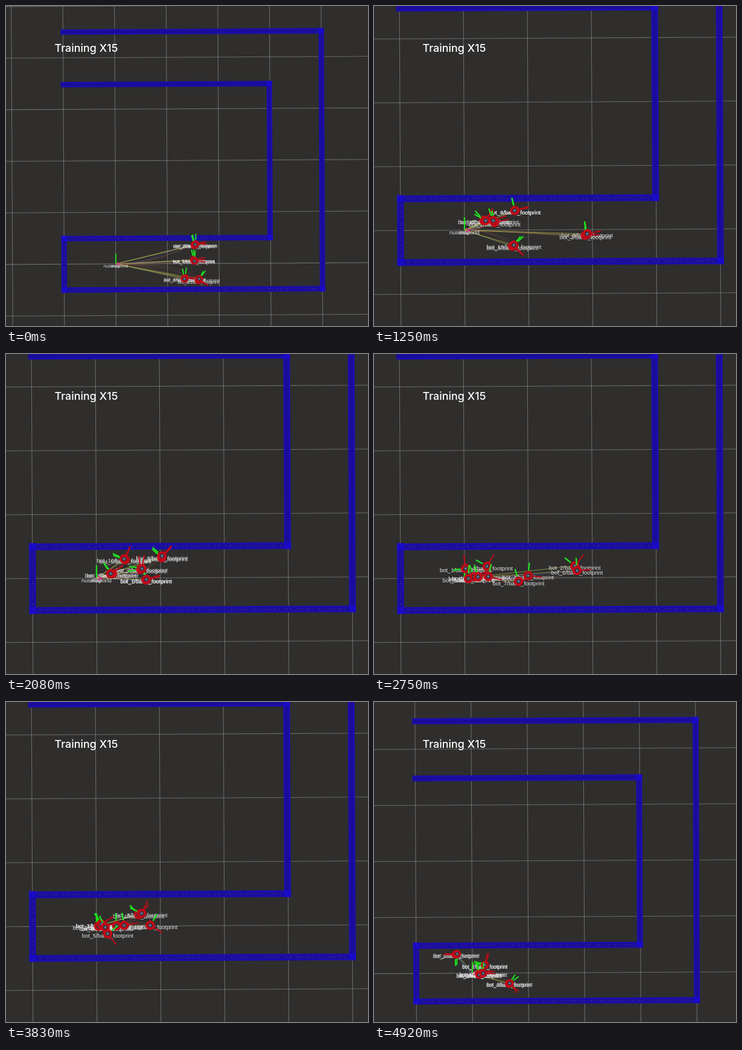
Write an HTML page that moves like this. It is 600x531 px and loops after 5 s.

```html
<!DOCTYPE html>
<html lang="en">
<head>
<meta charset="utf-8">
<title>Training X15</title>
<style>
  html, body { margin: 0; width: 100%; height: 100%; overflow: hidden; background: #2f2e2d; }
  svg { display: block; width: 100vw; height: 100vh; }
  .grid { stroke: #a5a5a5; stroke-opacity: .5; stroke-width: 1.1; }
  .grid line { vector-effect: non-scaling-stroke; }
  .wall { fill: none; stroke: #1b0eaa; stroke-width: 10.6; }
  .core { fill: none; stroke: #190c98; stroke-width: 4; }
  .speck { fill: none; stroke: #352a92; stroke-width: 1.2; stroke-dasharray: 3 2 1 4 5 2; }
  .post { fill: #1b0bc8; }
  .link { stroke: #abb052; stroke-opacity: .75; stroke-width: .9; }
  .trail { fill: none; stroke-width: .9; }
  .tag { font: 8.85px "Liberation Sans", Arial, sans-serif; fill: #e4e4e4; text-anchor: middle; }
  .red { stroke: #b80c18; stroke-width: 2; }
  .green { stroke: #1ee01e; stroke-width: 2.2; }
  .ring { fill: #33343c; stroke: #c00a18; stroke-width: 3.8; }
  .hub { fill: #66789a; }
  .title { font: 500 17.95px Inter, sans-serif; fill: #fff; }
</style>
</head>
<body>
<svg viewBox="0 0 600 531" preserveAspectRatio="none">
  <rect width="600" height="531" fill="#2f2e2d"/>
  <g id="map"><g id="grid" class="grid"></g><g id="walls"></g></g>
  <g id="scene">
    <g id="lines"></g>
    <g id="tags"></g>
    <path d="M0 -1V-20" class="green"/>
    <path d="M2 -3L9 0L2 3" fill="none" stroke="#d02b86" stroke-width="1.6"/>
    <g id="bots"></g>
  </g>
  <text x="80.5" y="76" class="title">Training X15</text>
</svg>
<script>
const LOOP = 5000, STEPS = 60, CELL = 100, BOTS = 10, RAD = Math.PI / 180;
const $ = id => document.getElementById(id);

function set(el, attrs) {
  for (const k in attrs) el.setAttribute(k, attrs[k]);
}
function add(parent, tag, attrs, text) {
  const el = document.createElementNS("http://www.w3.org/2000/svg", tag);
  set(el, attrs);
  if (text) el.textContent = text;
  return parent.appendChild(el);
}
const mix = (a, b, u) => a + (b - a) * u;
const clamp = u => Math.max(0, Math.min(1, u));

let seed = 15;
function jitter(size) {
  seed = (seed * 16807) % 2147483647;
  return (seed / 2147483647 * 2 - 1) * size;
}

// View: origin x, origin y, pixels per cell
const firstView = [182, 428, 85.6];
const moves = [
  { from: 0, steps: 5, to: [144, 323.5, 106] },
  { from: 8, steps: 5, to: [150, 372, 106] },
  { from: 49, steps: 2, to: [141, 426, 105.7] },
  { from: 51, steps: 4, to: [163, 450, 93] }
];
const camera = n => moves.reduce(
  (view, m) => view.map((v, k) => mix(v, m.to[k], clamp((n - m.from) / m.steps))), firstView);

// Each scene has a few spots (x, y, heading); the bots, counted from the lead,
// share them in turn, and later arrivals stand a little off.
const scenes = [];
function scene(n, lead, ...spots) {
  const bots = [];
  for (let i = 0; i < BOTS; i++) {
    const [x, y, h] = spots[i % spots.length], off = i < spots.length ? 0 : 1;
    bots[(lead - 1 + i) % BOTS] = { x: x + jitter(3) * off, y: y + jitter(3) * off, h: h + jitter(20) * off };
  }
  scenes.push({ n, bots });
}
scene(0, 1, [151, -8, 0], [152, -36, 15], [160, 32, -28], [134, 27, -8]);
scene(6, 1, [322, -50, 98], [72, -25, 15], [47, 3, 10], [12, 0, 0]);
scene(15, 3, [189, 8, 2], [79, -31, 15], [75, 25, -40], [33, -15, 60], [45, -15, 20]);
scene(25, 3, [102, -32, 48], [25, -7, 40], [45, -29, 70], [78, 2, 18], [71, -15, 80]);
scene(41, 6, [274, -26, -10], [98, 25, -48], [44, -28, 95], [20, 3, 0], [31, 25, -92], [-74, -33, 180]);
scene(51, 10, [137, -28, 28], [22, -28, 145], [100, -12, 22], [10, -1, 40], [86, -6, 5], [15, 19, -97]);
scene(59, 1, [-30, -33, 180], [22, -14, 78], [12, 1, 15], [65, 19, -35], [18, 0, 10]);

// Curve driven from the origin to a pose
function curve(p) {
  const d = Math.hypot(p.x, p.y) * .22, a = p.h * RAD;
  return [[0, 0], [p.x * .5, 0], [p.x - Math.cos(a) * d, p.y + Math.sin(a) * d], [p.x, p.y]];
}
function along(points, u) {
  while (points.length > 1)
    points = points.slice(1).map((q, i) => q.map((v, k) => mix(points[i][k], v, u)));
  return points[0];
}
function drive(a, b, u) {
  const turn = ((b.h - a.h + 540) % 360 + 360) % 360 - 180;
  if (Math.hypot(b.x, b.y) > Math.hypot(a.x, a.y) - 25)
    return { x: mix(a.x, b.x, u), y: mix(a.y, b.y, u), h: a.h + turn * u };
  const crash = .35;                   // then respawn at the origin
  if (u < crash) {
    const d = u * 28, t = a.h * RAD;
    return { x: a.x + Math.cos(t) * d, y: a.y - Math.sin(t) * d, h: a.h };
  }
  const v = (u - crash) / (1 - crash), [x, y] = along(curve(b), v);
  return { x, y, h: b.h * v };
}

for (let p = -700; p <= 700; p += CELL) {
  add($("grid"), "line", { x1: p, x2: p, y1: -700, y2: 400 });
  add($("grid"), "line", { x1: -700, x2: 700, y1: p, y2: p });
}
const walls = "M-105 -450H400V50H-100V-50M-105 -348H299V-49.5H-105";
for (const kind of ["wall", "core"]) add($("walls"), "path", { d: walls, class: kind });
add($("walls"), "path", { d: "M290 -49.5H-95M-100 -40V45M-90 50H390", class: "speck" });
for (const [x, y] of [[400, -450], [400, 50], [-100, 50], [-100, -50], [299, -49.5], [299, -348]])
  add($("walls"), "rect", { x: x - 5.4, y: y - 5.4, width: 10.8, height: 10.8, class: "post" });

for (const name of ["nusim/world", "map"]) add($("tags"), "text", { x: 0, y: 7, class: "tag" }, name);

const bots = Array.from({ length: BOTS }, (_, i) => {
  const blue = i % 5 === 0;
  const bot = {
    trail: add($("lines"), "path", { class: "trail", stroke: blue ? "#3f4fa6" : "#a5604c", opacity: blue ? .75 : .4 }),
    link: add($("lines"), "line", { x1: 0, y1: 0, class: "link" }),
    tag: add($("tags"), "text", { class: "tag" }, `bot_${i + 1}/base_footprint`),
    body: add($("bots"), "g", {})
  };
  add(bot.body, "path", { d: "M5 0H22", class: "red" });
  add(bot.body, "path", { d: "M0 -8V-20", class: "green" });
  add(bot.body, "circle", { r: 5.4, class: "ring" });
  add(bot.body, "circle", { r: 1.8, class: "hub" });
  return bot;
});

function draw(ms) {
  // source clock ticks in whole steps, rounded to 10 ms
  const n = Math.floor((ms % LOOP + 4) * STEPS / LOOP) % STEPS;
  const [ox, oy, size] = camera(n), k = size / CELL;
  set($("map"), { transform: `translate(${ox} ${oy}) rotate(-.29) scale(${k})` });
  set($("scene"), { transform: `translate(${ox} ${oy}) scale(${k})` });

  let i = 0;
  while (i < scenes.length - 2 && n >= scenes[i + 1].n) i++;
  const a = scenes[i], b = scenes[i + 1], u = (n - a.n) / (b.n - a.n);
  bots.forEach((bot, j) => {
    const p = drive(a.bots[j], b.bots[j], u), [start, ...rest] = curve(p);
    set(bot.trail, { d: `M${start}C${rest.join(" ")}` });
    set(bot.link, { x2: p.x, y2: p.y });
    set(bot.tag, { x: p.x, y: p.y + 6 });
    set(bot.body, { transform: `translate(${p.x} ${p.y}) rotate(${-p.h})` });
  });
}

const began = performance.now();
function tick() {
  draw(performance.now() - began);
  requestAnimationFrame(tick);
}
draw(0);
requestAnimationFrame(tick);
</script>
</body>
</html>
```
